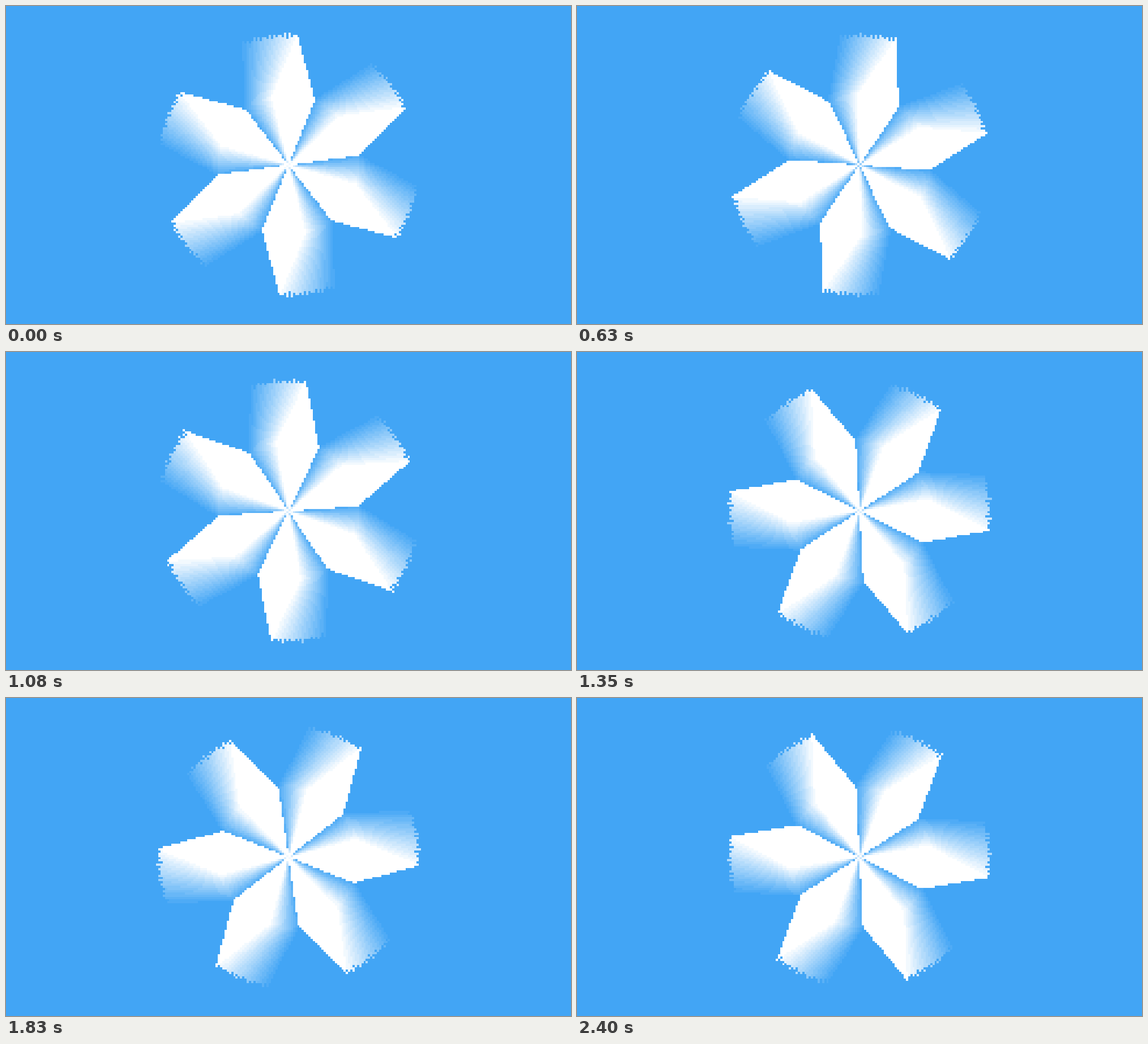
Recreate the animation shown at these times as an HTML page with a canvas. Size 998x561 px, loop 2430 ms.

```html
<!DOCTYPE html>
<html lang="en">
<head>
<meta charset="utf-8">
<title>Spinning petals</title>
<style>
  html, body { margin: 0; width: 100%; height: 100%; overflow: hidden; background: #42a5f5; }
  canvas { display: block; width: 100vw; height: 100vh; }
</style>
</head>
<body>
<canvas id="stage" width="998" height="561"></canvas>
<script>
const COLS = 256, ROWS = 144;
const LENGTH = 60, SLOPE = 1 / 3, SECTOR = Math.PI / 3;
const FRAME_MS = 30, LOOP_MS = 2430;
const TURN_PER_FRAME = 0.06, START_ANGLE = 3.8 * Math.PI / 180;
const TRAIL_STEP = 0.03, TRAIL_COUNT = 15;
const BLUE = [0x42, 0xa5, 0xf5];

const stage = document.getElementById('stage').getContext('2d');
stage.imageSmoothingEnabled = false;

const grid = document.createElement('canvas');
grid.width = COLS;
grid.height = ROWS;
const gridCtx = grid.getContext('2d');
const image = gridCtx.createImageData(COLS, ROWS);

// Polar position of every cell the petals can reach; angles run clockwise from up.
const cells = [];
for (let row = 0; row < ROWS; row++) {
  for (let col = 0; col < COLS; col++) {
    const x = col + 0.5 - COLS / 2, y = row + 0.5 - ROWS / 2;
    const radius = Math.hypot(x, y);
    const offset = (row * COLS + col) * 4;
    image.data.set([...BLUE, 255], offset);
    if (radius <= LENGTH) cells.push({ offset, radius, angle: Math.atan2(x, -y) });
  }
}

function insidePetal(radius, angle) {
  const a = angle - SECTOR * Math.round(angle / SECTOR);
  const along = radius * Math.cos(a), across = Math.abs(radius * Math.sin(a));
  return across <= SLOPE * Math.min(along, LENGTH - along);
}

// Brightness drops linearly with the time since a petal last covered the cell.
function brightness(radius, angle) {
  for (let age = 0; age < TRAIL_COUNT; age++) {
    if (insidePetal(radius, angle + age * TRAIL_STEP)) return 1 - age / TRAIL_COUNT;
  }
  return 0;
}

function draw(frame) {
  const turn = START_ANGLE + frame * TURN_PER_FRAME;
  for (const { offset, radius, angle } of cells) {
    const light = brightness(radius, angle - turn);
    for (let c = 0; c < 3; c++) {
      image.data[offset + c] = BLUE[c] + (255 - BLUE[c]) * light;
    }
  }
  gridCtx.putImageData(image, 0, 0);
  stage.drawImage(grid, 0, 0, 998, 561);
}

let start = null, shown = 0;
function tick(now) {
  if (start === null) start = now;
  const frame = Math.floor((Math.max(0, now - start) % LOOP_MS) / FRAME_MS);
  if (frame !== shown) draw(shown = frame);
  requestAnimationFrame(tick);
}
draw(0);
requestAnimationFrame(tick);
</script>
</body>
</html>
```
